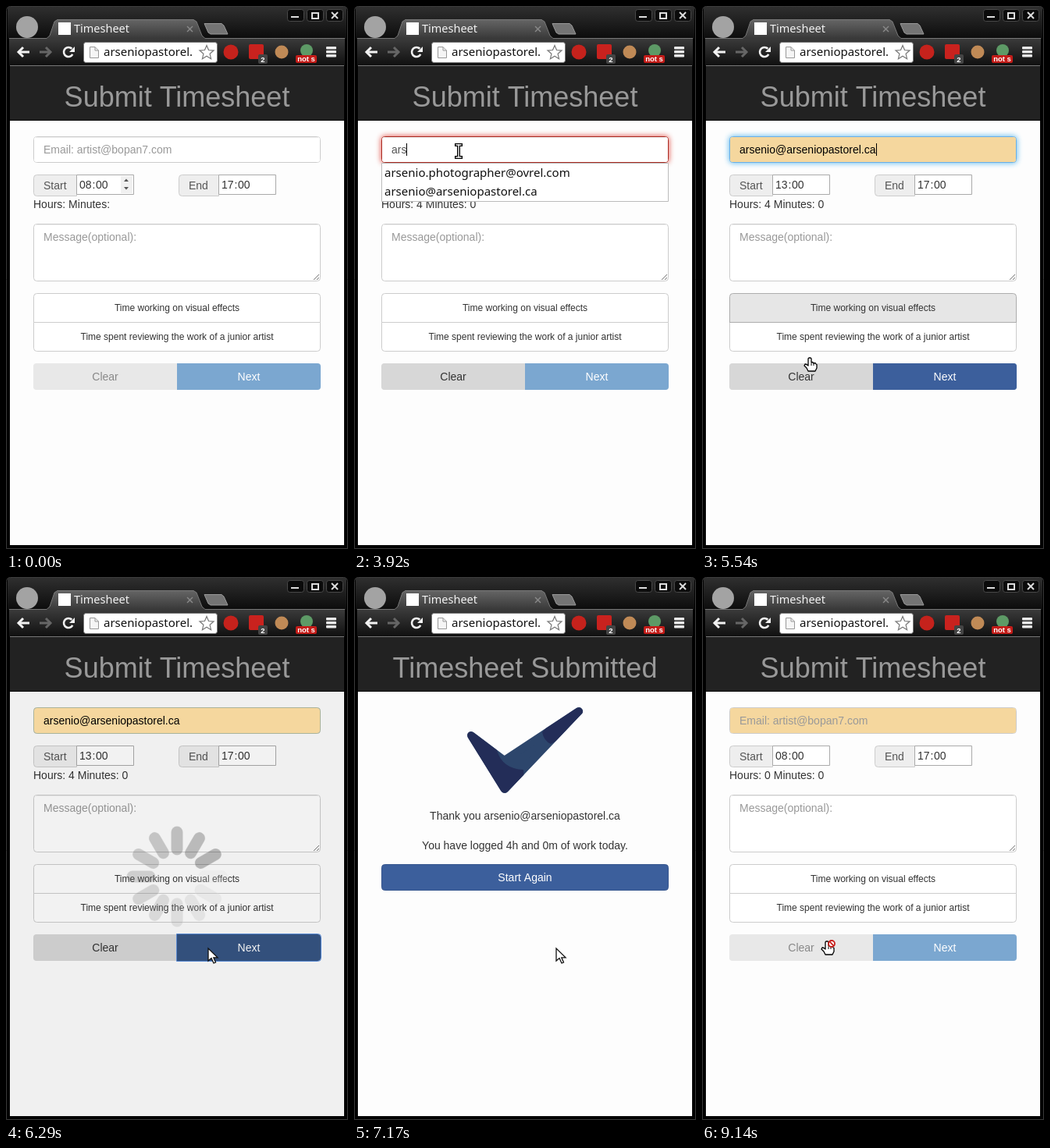
Write an HTML page with a canvas that moves like this. It is 438 px wide and 696 px high and loops after 9620 ms.

```html
<!DOCTYPE html>
<html lang="en">
<head>
<meta charset="utf-8">
<title>Timesheet</title>
<style>
html, body { margin: 0; width: 100%; height: 100%; overflow: hidden; background: #000; }
canvas { display: block; }
</style>
</head>
<body>
<canvas id="stage" width="438" height="696"></canvas>
<script>
const ctx = document.getElementById('stage').getContext('2d');
const LOOP = 9620;
const SANS = '"Liberation Sans", Arial, sans-serif';
const UI = '"Noto Sans", "Open Sans", sans-serif';
const EMAILS = ['arsenio.photographer@ovrel.com', 'arsenio@arseniopastorel.ca'];
const SHORT_EMAIL = 'ap@arseniopastorel.ca';
const KEY_TIMES = [3710, 3830, 3920, 3960, 4140, 4290, 4330];
const SENT = 6210, DONE = 7170, AGAIN = 8340;
const POINTER = [
  [2960, 148, 214], [3090, 134, 186], [5460, 134, 186], [5500, 137, 385],
  [5540, 138, 450], [5660, 165, 533], [5780, 225, 520], [5900, 259, 476],
  [7970, 259, 476], [8090, 250, 380], [8820, 250, 380], [9100, 160, 467]
];

const fade = (t, from, to) => Math.min(1, Math.max(0, (t - from) / (to - from)));
const between = (t, from, to) => t >= from && t < to;

function text(str, x, y, size, color, { align = 'left', family = SANS, weight = 400 } = {}) {
  ctx.font = `${weight} ${size}px ${family}`;
  ctx.textAlign = align;
  ctx.fillStyle = color;
  ctx.fillText(str, x, y);
}
const centered = (str, x, y, size, color) => text(str, x, y, size, color, { align: 'center' });

function rect(x, y, w, h, color) {
  ctx.fillStyle = color;
  ctx.fillRect(x, y, w, h);
}

function box(x, y, w, h, fill, stroke, radius = 0) {
  const inset = stroke ? 0.5 : 0;
  ctx.beginPath();
  ctx.roundRect(x + inset, y + inset, w - 2 * inset, h - 2 * inset, radius);
  paint(fill, stroke);
}

function paint(fill, stroke, width = 1) {
  if (fill) { ctx.fillStyle = fill; ctx.fill(); }
  if (stroke) { ctx.strokeStyle = stroke; ctx.lineWidth = width; ctx.stroke(); }
}

function shape(points, fill, stroke, width, closed = true) {
  ctx.beginPath();
  points.forEach(([x, y]) => ctx.lineTo(x, y));
  if (closed) ctx.closePath();
  paint(fill, stroke, width);
}
const line = (points, color, width = 1) => shape(points, null, color, width, false);

function disc(x, y, r, fill, stroke, width) {
  ctx.beginPath();
  ctx.arc(x, y, r, 0, 7);
  paint(fill, stroke, width);
}

function shade(y0, y1, top, bottom) {
  const g = ctx.createLinearGradient(0, y0, 0, y1);
  g.addColorStop(0, top);
  g.addColorStop(1, bottom);
  return g;
}

function browser() {
  rect(0, 0, 438, 696, '#000');
  box(0, 0, 438, 696, null, '#3a3a3a', [5, 5, 0, 0]);
  rect(2, 1, 434, 41, shade(0, 42, '#303030', '#0c0c0c'));
  rect(4, 42, 430, 34, shade(42, 76, '#3a3a3a', '#101010'));

  disc(27, 27, 14, '#a3a3a3');
  shape([[52, 42], [56, 38], [62, 20], [66, 17], [240, 17], [244, 20], [251, 38], [255, 42]],
    shade(17, 42, '#666', '#383838'));
  line([[4, 41.5], [52, 41.5], [56, 38], [62, 20], [66, 17.5], [240, 17.5], [244, 20], [251, 38], [255, 41.5], [434, 41.5]], '#777');
  rect(67, 21, 16, 16, '#fff');
  text('Timesheet', 87, 34, 14.5, '#f2f2f2', { family: UI });
  line([[232, 26], [239, 33]], '#888', 1.5);
  line([[239, 26], [232, 33]], '#888', 1.5);
  shape([[254, 22.5], [276, 22.5], [279, 25], [284, 36], [262, 36], [259, 34]], '#747474', '#999');

  for (const x of [360, 385, 410]) box(x, 4, 22, 16, '#0b0b0b', '#484848', 3);
  rect(365, 13, 10, 2, '#ddd');
  ctx.strokeStyle = '#ddd';
  ctx.lineWidth = 2;
  ctx.strokeRect(392, 9, 8, 7);
  line([[417, 8], [425, 16]], '#ddd', 2);
  line([[425, 8], [417, 16]], '#ddd', 2);

  for (const [x, color] of [[14, '#f2f2f2'], [59, '#666']]) {
    const d = x < 30 ? 1 : -1;
    line([[x + 16 * d, 59], [x + 2 * d, 59]], color, 3);
    line([[x + 8 * d, 53], [x + 2 * d, 59], [x + 8 * d, 65]], color, 3);
  }
  ctx.beginPath();
  ctx.arc(80, 59, 6, 0.5, 5.5);
  paint(null, '#f2f2f2', 2.6);
  shape([[88, 52], [88, 59], [81, 59]], '#f2f2f2');

  box(99, 46, 172, 27, '#fff', '#777', 3);
  shape([[107.5, 52.5], [114, 52.5], [118.5, 57], [118.5, 66.5], [107.5, 66.5]], '#f5f5f5', '#999');
  line([[114, 52.5], [114, 57], [118.5, 57]], '#999');
  text('arseniopastorel.', 125, 64, 15, '#111', { family: UI, weight: 500 });
  const star = Array.from({ length: 10 }, (_, i) => {
    const r = i % 2 ? 4.3 : 9.5, a = (i / 5 - 0.5) * Math.PI;
    return [257 + r * Math.cos(a), 60 + r * Math.sin(a)];
  });
  shape(star, '#fff', '#777', 1.2);

  disc(288, 59, 9.5, '#c5221c');
  box(311, 49, 19, 19, '#c9221e', null, 2);
  box(323, 62, 12, 12, '#444', null, 2);
  text('2', 329, 71.5, 9.5, '#fff', { align: 'center', weight: 700 });
  disc(353, 59, 8.5, '#c08a56');
  disc(385, 57, 8, '#5d9a66');
  box(371, 63, 27, 10, '#c41c18', null, 2);
  text('not s', 384.5, 71, 9.5, '#fff', { align: 'center', weight: 700 });
  for (const y of [52, 57, 62]) box(410, y, 13, 3.5, '#e8e8e8', null, 1);

  rect(5, 76, 428, 1, '#777');
  rect(5, 77, 428, 69, '#222');
  rect(5, 146, 428, 1, '#080808');
  rect(5, 147, 428, 544, '#fdfdfd');
}

function pointerAt(t) {
  const i = POINTER.findIndex(p => p[0] > t);
  if (i < 0) return POINTER[POINTER.length - 1].slice(1);
  if (i === 0) return null;
  const [t0, x0, y0] = POINTER[i - 1], [t1, x1, y1] = POINTER[i];
  const k = fade(t, t0, t1);
  return [x0 + (x1 - x0) * k, y0 + (y1 - y0) * k];
}

// Hover styles trail the pointer by one tick.
function hovered(t) {
  const p = pointerAt(t - 40);
  if (!p) return '';
  const [x, y] = p;
  if (between(t, DONE, AGAIN)) return y >= 368 && y < 402 ? 'again' : '';
  if (y < 201) return 'email';
  if (y >= 368 && y < 406) return 'item0';
  if (y >= 406 && y < 443) return 'item1';
  if (y >= 458 && y < 492) return x < 219 ? 'clear' : 'next';
  return '';
}

function timeInput(x, hour, focused) {
  box(x, 216, 74, 26, '#fff', focused ? '#4f94d4' : '#aaa');
  if (focused) {
    box(x - 1, 215, 76, 28, null, 'rgba(90,155,215,.5)', 1);
    rect(x + 3, 220, 18, 18, '#a9d3f5');
  }
  text(String(hour).padStart(2, '0'), x + 4, 234, 14, '#333');
  text(':', x + 20.5, 234, 14, '#333');
  text('00', x + 25, 234, 14, '#333');
}

function stepper(t) {
  rect(147, 218, 15, 22, '#f0f0f0');
  const hot = between(t, 800, 2720);
  if (hot) rect(147, 218, 15, 10, '#777');
  shape([[151, 225], [157, 225], [154, 221.5]], hot ? '#eee' : '#555');
  shape([[151, 232], [157, 232], [154, 235.5]], '#555');
}

function form(t, hover) {
  const fresh = t >= AGAIN;
  const hour = fresh || t < 2030 ? 8 : t < 2240 ? 9 : Math.min(13, 10 + Math.floor((t - 2240) / 48));
  centered('Submit Timesheet', 219, 129, 36, '#999');

  box(35, 216, 56, 28, '#eee', '#ccc', [4, 0, 0, 4]);
  text('Start', 48, 235, 14, '#555');
  timeInput(90, hour, between(t, 2030, 2960));
  if (t < 2960) stepper(t);
  box(221, 216, 52, 28, '#eee', '#ccc', [4, 0, 0, 4]);
  text('End', 234, 235, 14, '#555');
  timeInput(272, 17, false);
  const worked = fresh ? 0 : 17 - hour;
  text(t < 2030 ? 'Hours: Minutes:' : `Hours: ${worked} Minutes: 0`, 35, 259, 14, '#333');

  box(35, 279, 368, 74, '#fff', '#ccc', 4);
  rect(37, 280, 364, 1, '#ececec');
  text('Message(optional):', 48, 301, 14, '#999');
  line([[394, 351], [401, 344]], '#777');
  line([[398, 351], [401, 348]], '#777');

  const busy = between(t, SENT, DONE);
  const items = ['Time working on visual effects', 'Time spent reviewing the work of a junior artist'];
  items.forEach((label, i) => {
    const on = !busy && hover === 'item' + i;
    box(35, 368 + 37 * i, 368, 38, on ? '#e6e6e6' : '#fff', on ? '#adadad' : '#ccc', i ? [0, 0, 4, 4] : [4, 4, 0, 0]);
    centered(label, 219, 391 + 37 * i, 12, '#333');
  });
  if (!busy && hover === 'item0') rect(35, 405, 368, 1, '#adadad');

  const canClear = between(t, 2030, DONE);
  box(35, 458, 184, 34, canClear ? '#d7d7d7' : '#e8e8e8', null, [4, 0, 0, 4]);
  centered('Clear', 127, 480, 14, canClear ? '#333' : '#888');
  box(219, 458, 184, 34, '#7ba7d0', null, [0, 4, 4, 0]);
  if (!fresh) {
    ctx.globalAlpha = fade(t, 5140, 5300);
    box(219, 458, 184, 34, busy || hover === 'next' ? '#365483' : '#3c5f9c', null, [0, 4, 4, 0]);
    ctx.globalAlpha = 1;
  }
  if (busy) box(218, 457, 186, 36, null, '#5c8fdc', [0, 4, 4, 0]);
  centered('Next', 311, 480, 14, '#fff');
}

function glow(color, rim, amount) {
  if (amount <= 0) return;
  ctx.save();
  ctx.globalAlpha = amount;
  ctx.shadowColor = color;
  ctx.shadowBlur = 7;
  box(35, 167, 368, 34, '#fff', rim, 4);
  ctx.restore();
}

function emailField(t) {
  const focused = between(t, 3090, SENT);
  const filled = t >= 4710;
  const valid = fade(t, 5140, 5300);
  const red = t < SENT ? fade(t, 3710, 3880) - valid : 0;
  const blue = focused ? fade(t, 3090, 3300) - red : 0;
  box(35, 167, 368, 34, '#fff', '#ccc', 4);
  glow('rgba(70,175,235,.9)', '#66afe9', blue);
  glow('rgba(225,60,50,.9)', '#a8281f', red);
  box(36, 168, 366, 32, filled ? '#f5d79e' : '#fff', null, 3);
  if (!filled) rect(38, 168, 362, 1, '#ececec');

  let value = '';
  if (t < AGAIN) {
    value = t >= 4860 ? EMAILS[1] : filled ? EMAILS[0]
      : EMAILS[1].slice(0, KEY_TIMES.filter(k => t >= k).length);
  }
  text(value || 'Email: artist@bopan7.com', 48, 189, 14, !value ? '#999' : filled ? '#000' : '#555');
  if (focused) rect(Math.round(48 + (value ? ctx.measureText(value).width : 0)), 176, 1, 16, '#000');
}

function suggestions(t) {
  if (!between(t, 3710, 5140)) return;
  const rows = t < KEY_TIMES[1] ? [...EMAILS, SHORT_EMAIL] : EMAILS;
  box(35, 201, 368, 2 + 24 * rows.length, '#fff', '#bbb');
  const chosen = t < 4710 ? -1 : t < 4860 ? 0 : 1;
  rows.forEach((row, i) => {
    if (i === chosen) rect(36, 202 + 24 * i, 366, 24, '#cdcdcd');
    text(row, 39, 219 + 24 * i, 15, '#111', { family: UI, weight: 500 });
  });
}

function spinner(t) {
  const lead = 2 + Math.floor((t - 6770) / 40);
  for (let i = 0; i < 12; i++) {
    const age = ((lead - i) % 12 + 12) % 12;
    const v = age * 20;
    ctx.save();
    ctx.translate(219, 384);
    ctx.rotate((i - 3) * Math.PI / 6);
    ctx.beginPath();
    ctx.roundRect(27.5, -7.5, 37, 15, 7.5);
    paint(`rgb(${v},${v},${v})`, '#e4e4e4');
    ctx.restore();
  }
}

function checkmark() {
  const points = [[150, 203], [192.5, 235], [288, 172], [193, 272]];
  ctx.lineJoin = 'round';
  shape(points, '#2d466c', '#2d466c', 10);
  ctx.save();
  // Clip to the rounded outline so the dark facets follow its edge.
  const outline = new Path2D('M147 199Q150 197 154 200L192.5 229L285 168Q290 166 292.5 170Q294 174 291 176L197 275Q192 279 188 274L146 206Q144 202 147 199Z');
  ctx.clip(outline);
  ctx.fillStyle = '#232d58';
  ctx.fill(new Path2D('M140 190H163L183 222Q190 246 217 247L220 285H140Z'));
  ctx.fill(new Path2D('M300 160H276L241 199Q243 210 252 214L300 190Z'));
  ctx.restore();
  ctx.lineJoin = 'miter';
}

function receipt(hover) {
  centered('Timesheet Submitted', 219, 129, 36, '#999');
  checkmark();
  centered('Thank you ' + EMAILS[1], 219, 311, 14, '#333');
  centered('You have logged 4h and 0m of work today.', 219, 349, 14, '#333');
  box(35, 368, 368, 34, hover === 'again' ? '#365483' : '#3c5f9c', '#38588f', 4);
  centered('Start Again', 219, 390, 14, '#fff');
}

const ARROW = [[0, 0], [0, 16], [4, 12.5], [7, 19], [9.5, 18], [6.8, 11.8], [12, 11.8]];
const HAND = [[-2, 1], [-1, 0], [1, 0], [2, 1], [2, 6], [4, 5.5], [5, 7], [7, 6.5], [8, 8], [9, 8.5],
  [9, 13], [7, 17], [-2, 17], [-4, 13], [-7, 10], [-6, 8], [-4, 8.5], [-2, 10]];

function pointer(t, hover) {
  const p = pointerAt(t);
  if (!p) return;
  ctx.save();
  ctx.translate(Math.round(p[0]), Math.round(p[1]));
  const busy = between(t, SENT, DONE);
  if (t < 5460 || (hover === 'email' && t < 5500)) {
    const beam = [[[-3, -8], [3, -8]], [[0, -8], [0, 8]], [[-3, 8], [3, 8]]];
    for (const part of beam) {
      ctx.lineCap = 'square';
      line(part, '#000', 4);
    }
    for (const part of beam) line(part, '#fff', 1.4);
  } else if (hover && !busy) {
    ctx.lineJoin = 'round';
    shape(HAND, '#fff', '#000', 1.3);
    for (const x of [2, 5]) line([[x, 7], [x, 10]], '#000');
    if (hover === 'clear' && t >= AGAIN) {
      disc(6, 3, 4, '#fff', '#c8201c', 1.8);
      line([[3.2, 0.2], [8.8, 5.8]], '#c8201c', 1.8);
    }
  } else {
    shape(ARROW, '#fff', '#111', 1.3);
  }
  ctx.restore();
}

function draw(t) {
  const hover = hovered(t);
  browser();
  if (between(t, DONE, AGAIN)) {
    receipt(hover);
  } else {
    form(t, hover);
    const busy = between(t, SENT, DONE);
    const dim = busy ? fade(t, 6250, 6410) : 0;
    rect(5, 147, 428, 544, `rgba(0,0,0,${0.2 * dim})`);
    emailField(t);
    suggestions(t);
    if (dim) {
      box(35, 167, 368, 34, null, '#a9b39b', 4);
      ctx.globalAlpha = dim;
      spinner(t);
      ctx.globalAlpha = 1;
    }
  }
  pointer(t, hover);
}

const start = performance.now();
function tick() {
  draw((performance.now() - start) % LOOP);
  requestAnimationFrame(tick);
}
tick();
</script>
</body>
</html>
```
